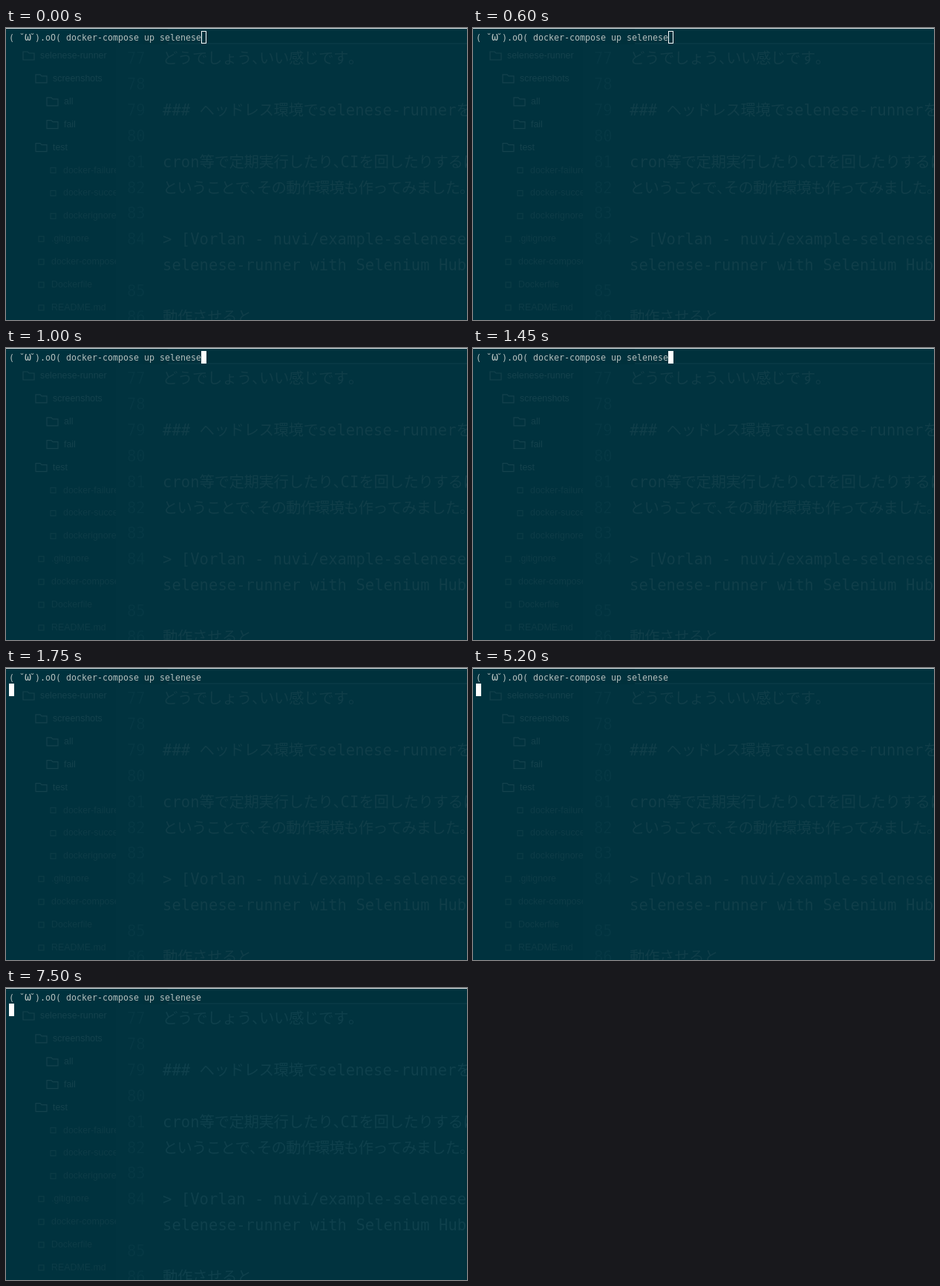
An HTML page with a canvas for the animation above (8 s loop, 621 px wide and 394 px high).

```html
<!DOCTYPE html>
<html lang="ja">
<head>
<meta charset="utf-8">
<title>Terminal</title>
<style>
  html, body { margin: 0; width: 100%; height: 100%; overflow: hidden; background: #00323e; }
  canvas { display: block; }
</style>
</head>
<body>
<canvas id="stage" width="621" height="394"></canvas>
<script>
const ctx = document.getElementById('stage').getContext('2d');
const W = 621, H = 394, LOOP = 8000;
const MONO = '"DejaVu Sans Mono", "Noto Sans CJK JP", "Noto Sans CJK", monospace';
const SANS = '"Liberation Sans", sans-serif';
const CELL = 7, ROW = 17;
const COMMAND = '( ˘ω˘).oO( docker-compose up selenese';

// Rows of the editor behind the terminal: [line number, text, wide character advance]
const editorRows = [
  [77, 'どうでしょう、いい感じです。'],
  [78, ''],
  [79, '### ヘッドレス環境でselenese-runnerを'],
  [80, ''],
  [81, 'cron等で定期実行したり、CIを回したりするに'],
  [82, 'ということで、その動作環境も作ってみました。', 19.5],
  [83, ''],
  [84, '> [Vorlan - nuvi/example-selenese'],
  [0, 'selenese-runner with Selenium Hub'],
  [85, ''],
  [86, '動作させると']
];

// Sidebar entries: [text x, label, is folder]
const sidebarRows = [
  [46, 'selenese-runner', true],
  [63, 'screenshots', true],
  [78, 'all', true],
  [78, 'fail', true],
  [63, 'test', true],
  [77, 'docker-failure'],
  [77, 'docker-success'],
  [77, 'dockerignore'],
  [61, '.gitignore'],
  [61, 'docker-compose'],
  [61, 'Dockerfile'],
  [61, 'README.md']
];

function rect(x, y, w, h, color) {
  ctx.fillStyle = color;
  ctx.fillRect(x, y, w, h);
}

function advance(ch, wide) {
  if (ch < '\u0080') return 12.4;
  return '、。'.includes(ch) ? 10 : wide;
}

function drawEditor(ink, faint) {
  ctx.font = `20.5px ${MONO}`;
  editorRows.forEach(([number, text, wide = 20], i) => {
    const y = 48 + i * 34.9;
    if (number) {
      ctx.fillStyle = faint;
      ctx.fillText(number, 163, y);
    }
    ctx.fillStyle = ink;
    let x = 211;
    for (const ch of text) {
      ctx.fillText(ch, x, y);
      x += advance(ch, wide);
    }
  });
}

function drawFolder(x, y) {
  ctx.beginPath();
  ctx.moveTo(x, y - 5);
  ctx.lineTo(x + 6, y - 5);
  ctx.lineTo(x + 8, y - 3);
  ctx.lineTo(x + 15, y - 3);
  ctx.lineTo(x + 15, y + 6);
  ctx.lineTo(x, y + 6);
  ctx.closePath();
  ctx.stroke();
}

function drawSidebar(ink, faint) {
  ctx.save();
  ctx.beginPath();
  ctx.rect(0, 0, 148, H);
  ctx.clip();
  ctx.font = `12.4px ${SANS}`;
  ctx.lineWidth = 1.2;
  sidebarRows.forEach(([x, label, folder], i) => {
    const y = 37 + i * 30.9;
    ctx.fillStyle = ctx.strokeStyle = folder ? ink : faint;
    if (folder) drawFolder(x - 23, y);
    else ctx.strokeRect(x - 17, y - 3, 7, 7);
    ctx.fillText(label, x, y + 4);
  });
  ctx.restore();
}

function drawBackdrop(t) {
  const late = t >= 7500;
  rect(0, 0, W, H, '#00323e');
  rect(148, 22, W - 148, H - 22, '#01333f');
  rect(185, 1, W - 185, 21, '#00313c');
  rect(218, 1, W - 218, 2, '#073844');
  rect(218, 20, W - 218, 2, '#073844');
  rect(618, 22, 3, H - 22, '#01313c');
  drawEditor(late ? '#0f404c' : '#103e49', '#063844');
  drawSidebar('#14424d', '#0d3c47');
  rect(0, 0, W, 1, '#e0e5e5');
}

function drawCommand() {
  ctx.fillStyle = '#b4bfbd';
  ctx.font = `11.63px ${MONO}`;
  ctx.fillText(COMMAND.replace('ω', ' '), 4, 17);
  // The omega is wider than its cell and runs under the next mark
  ctx.font = `15px ${MONO}`;
  ctx.fillText('ω', 4 + COMMAND.indexOf('ω') * CELL, 17);
}

function drawCursor(t) {
  const x = 4 + COMMAND.length * CELL;
  if (t < 1000) {
    ctx.strokeStyle = '#fff';
    ctx.lineWidth = 1;
    ctx.strokeRect(x + .5, 4.5, CELL - 1, ROW - 1);
  } else if (t < 1750) {
    rect(x, 4, CELL, ROW, '#fff');
  } else {
    rect(4, 4 + ROW, CELL, ROW, '#fff');
  }
}

function tick() {
  const t = performance.now() % LOOP;
  drawBackdrop(t);
  drawCommand();
  drawCursor(t);
  requestAnimationFrame(tick);
}
tick();
</script>
</body>
</html>
```
